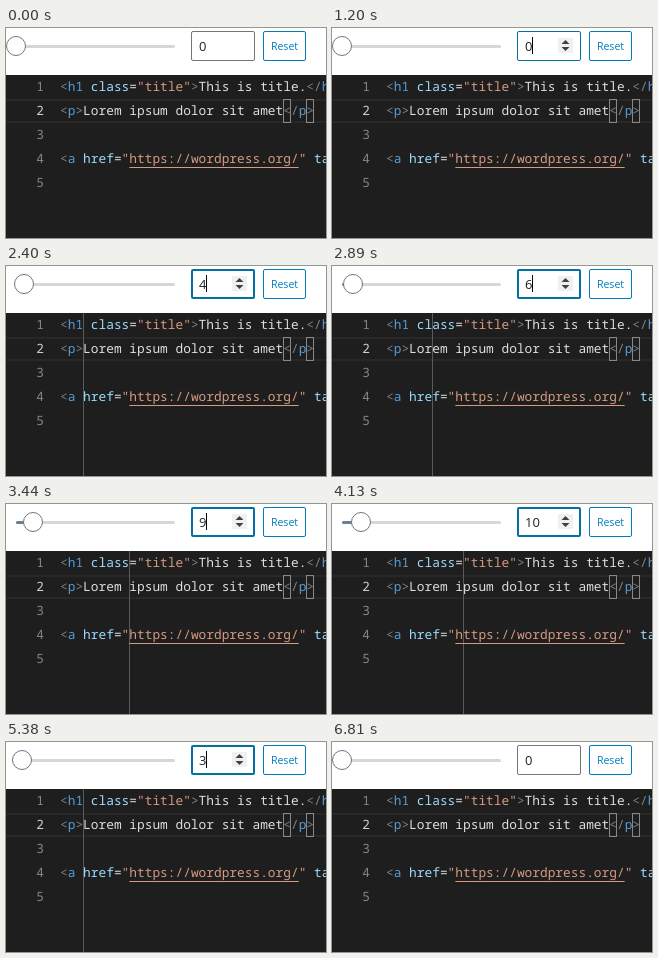
Animation of 320 by 210 pixels, one loop 6860 ms. Source, as an HTML page:

```html
<!DOCTYPE html>
<html lang="en">
<head>
<meta charset="utf-8">
<title>Editor ruler control</title>
<style>
html, body { margin: 0; width: 100%; height: 100%; overflow: hidden; background: #fff; }
body { position: relative; }
body * { box-sizing: border-box; }
.abs, .abs > * { position: absolute; }

.panel { inset: 0 0 auto; height: 47px; font: 13px/30px "Open Sans", "Noto Sans", sans-serif; }
.track, .fill { left: 10px; top: 17px; height: 3px; border-radius: 2px; }
.track { width: 159px; background: #d4d8db; }
.fill { background: #6b7f93; }
.knob { left: 0; top: 8px; width: 20px; height: 20px; border: 1px solid #757575; border-radius: 50%; background: #fff; }
.field { left: 185px; top: 3px; width: 64px; height: 30px; border: 1px solid #757575; border-radius: 2px; }
.field.focus { border-color: #0071a1; }
.field.ring { border-width: 2px; }
.value { left: 193px; top: 3px; color: #222; white-space: pre; }
.caret { top: 9px; width: 1px; height: 17px; background: #000; }
.spin { left: 226px; top: 10px; width: 15px; height: 15px; }
.reset { left: 257px; top: 3px; width: 43px; height: 30px; border: 1px solid #007cba; border-radius: 2px;
  color: #007cba; font-size: 10.6px; line-height: 28px; text-align: center; }

.editor { left: 0; top: 47px; width: 100%; bottom: 0; overflow: hidden; background: #1e1e1e; color: #dedede;
  font: 500 12.833px/24px "Noto Sans Mono", "DejaVu Sans Mono", monospace; text-rendering: geometricPrecision;
  font-variant-ligatures: none; }
.active { left: 0; top: 24px; width: 100%; height: 24px; border: solid #282828; border-width: 2px 0; }
.ruler { left: 0; top: 0; width: 1px; height: 100%; background: #5a5a5a; }
.match { top: 24px; width: 8px; height: 24px; border: 1px solid #888; }
.nums { left: 0; top: -1px; width: 38px; text-align: right; color: #858585; white-space: pre; }
.nums b { font-weight: inherit; color: #d0d0d0; }
.code { left: 54px; top: -1px; margin: 0; font: inherit; white-space: pre; }
.code i, .code b, .code s, .code u, .code q { font: inherit; text-decoration: none; quotes: none; }
i { color: #808080; }
b { color: #569cd6; }
s { color: #9cdcfe; }
q, u { color: #d69a80; }
.code u { text-decoration: underline 1px; text-underline-offset: 4px; text-decoration-skip-ink: none; }
</style>
</head>
<body>
<div class="abs panel">
  <div class="track"></div>
  <div class="fill"></div>
  <div class="knob"></div>
  <div class="field"></div>
  <div class="value">0</div>
  <div class="caret"></div>
  <svg class="spin" viewBox="0 0 15 15">
    <path fill="#f0f0f0" d="M0 0h15v15H0z"/>
    <path class="lower" fill="#dcdcdc" d="M0 7h15v8H0z"/>
    <path fill="#404040" d="M3.5 6l4-4 4 4zM3.5 9l4 4 4-4z"/>
  </svg>
  <div class="reset">Reset</div>
</div>
<div class="abs editor">
  <div class="active"></div>
  <div class="ruler"></div>
  <div class="match" style="left:277px"></div>
  <div class="match" style="left:300px"></div>
  <div class="nums">1
<b>2</b>
3
4
5</div>
  <pre class="code"><i>&lt;</i><b>h1</b> <s>class</s>=<q>"title"</q><i>&gt;</i>This is title.<i>&lt;/</i><b>h1</b><i>&gt;</i>
<i>&lt;</i><b>p</b><i>&gt;</i>Lorem ipsum dolor sit amet<i>&lt;/</i><b>p</b><i>&gt;</i>

<i>&lt;</i><b>a</b> <s>href</s>=<q>"</q><u>https://wordpress.org/</u><q>"</q> <s>target</s>
</pre>
</div>
<script>
const LOOP = 6860, FOCUS = 1200, BLUR = 6810;
const CHAR = 7.7, CODE_LEFT = 54, KNOB_STEP = 1.9;

// [time, value, delay before the ruler follows]
const steps = [
  [1740, 1, 0], [1970, 2, 0], [2150, 3, 50], [2400, 4, 30], [2580, 5, 50],
  [2860, 6, 30], [3100, 7, 30], [3260, 8, 0], [3440, 9, 0], [3640, 10, 30],
  [4230, 9, 0], [4410, 8, 30], [4610, 7, 30], [4790, 6, 0], [4970, 5, 0],
  [5150, 4, 0], [5350, 3, 30], [5530, 2, 30], [5710, 1, 0], [5940, 0, 0]
];

const $ = name => document.querySelector("." + name);
const knob = $("knob"), fill = $("fill"), field = $("field"), value = $("value");
const caret = $("caret"), spin = $("spin"), lower = $("lower"), ruler = $("ruler");

const within = (t, from, to) => t >= from && t < to;
const show = (el, on) => { el.style.visibility = on ? "visible" : "hidden"; };

function render(t) {
  let count = 0, column = 0;
  for (const [at, n, delay] of steps) {
    if (t >= at) count = n;
    if (t >= at + delay) column = n;
  }

  value.textContent = count;
  knob.style.left = fill.style.width = KNOB_STEP * count + "px";
  ruler.style.left = Math.floor(CODE_LEFT + CHAR * column) + "px";
  show(ruler, column > 0);

  field.classList.toggle("focus", within(t, FOCUS, BLUR));
  field.classList.toggle("ring", within(t, FOCUS + 50, BLUR));

  caret.style.left = (count > 9 ? 207 : 200) + "px";
  show(caret, within(t, FOCUS, 6450) && !within(t, 4130, 4230));

  show(spin, within(t, 360, BLUR));
  spin.style.opacity = t < 440 ? .5 : 1;
  lower.style.opacity = within(t, 440, 640) ? 1 : 0;
}

const start = performance.now();
function tick() {
  render((performance.now() - start) % LOOP);
  requestAnimationFrame(tick);
}
tick();
</script>
</body>
</html>
```
